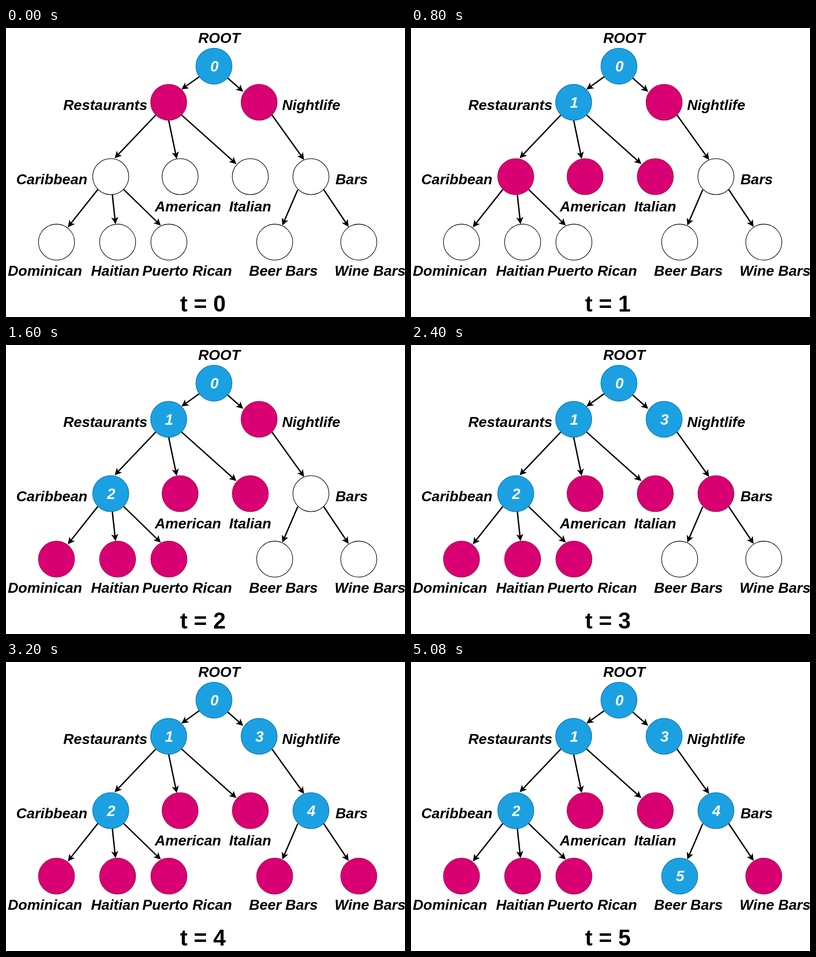
These frames come from a looping animation (878x638 px, 5800 ms). An HTML page:

```html
<!DOCTYPE html>
<html lang="en">
<head>
<meta charset="utf-8">
<title>Tree traversal</title>
<style>
  html, body { margin: 0; width: 100%; height: 100%; overflow: hidden; background: #fff; }
  svg { display: block; width: 878px; height: 638px; }
  text { font: italic bold 32px "Liberation Sans", Arial, sans-serif; white-space: pre; }
  .num { fill: #fff; font-size: 33px; text-anchor: middle; }
  .clock { font-style: normal; font-size: 49.5px; }
  circle { stroke-width: 1.3; }
  .idle { fill: #fff; stroke: #000; }
  .open { fill: #d80073; stroke: #a50040; }
  .done { fill: #1ba1e2; stroke: #006eaf; }
  .edge { stroke: #000; stroke-width: 3; }
</style>
</head>
<body>
<svg id="stage" viewBox="0 0 878 638"></svg>
<script>
const LOOP = 5800, STEP = 800, LAST = 5, NEVER = 9;

// cx, cy, step opened, step visited, label, label x, label baseline
const nodes = [
  [457.6, 84.3, 0, 0, "ROOT", 423, 33],
  [358, 164, 0, 1, "Restaurants", 126, 181],
  [557, 164, 0, 3, "Nightlife", 607.5, 181],
  [230.5, 328.1, 1, 2, "Caribbean", 22.5, 345],
  [383.1, 328.1, 1, NEVER, "American", 327.5, 405],
  [537.6, 328.1, 1, NEVER, "Italian", 491, 405],
  [671, 328.1, 3, 4, "Bars", 725, 345],
  [111.1, 472.7, 2, NEVER, "Dominican", 4, 547],
  [245.6, 472.7, 2, NEVER, "Haitian", 187, 547],
  [358.5, 472.7, 2, NEVER, "Puerto Rican", 300, 547],
  [591.2, 472.7, 4, 5, "Beer Bars", 534.8, 547],
  [776.3, 472.7, 4, NEVER, "Wine Bars", 723, 547]
];

// start x, start y, tip x, tip y
const edges = [
  [425, 107.7, 386, 135.7], [488, 110.7, 522, 140.7],
  [329.5, 192.2, 239, 287.5], [358, 204, 375.7, 289], [386.3, 192, 507, 300.3],
  [585.3, 192.2, 656, 291],
  [202, 356.5, 136, 440], [234, 368, 241, 433], [258.7, 356.2, 340.7, 436.2],
  [642, 357, 608, 436], [699, 356.7, 754, 439]
];

const stage = document.getElementById("stage");

function add(tag, attrs, text = "") {
  const el = document.createElementNS("http://www.w3.org/2000/svg", tag);
  for (const key in attrs) el.setAttribute(key, attrs[key]);
  el.textContent = text;
  return stage.appendChild(el);
}

for (const [x, y, tipX, tipY] of edges) {
  const len = Math.hypot(tipX - x, tipY - y);
  const angle = Math.atan2(tipY - y, tipX - x) * 180 / Math.PI;
  const transform = `translate(${tipX} ${tipY}) rotate(${angle})`;
  add("path", { class: "edge", d: `M${-len} 0H-10`, transform });
  add("path", { d: "M0 0L-15.5 7.8L-11.5 0L-15.5 -7.8Z", transform });
}

const views = nodes.map(([cx, cy, open, visit, label, x, y]) => {
  const circle = add("circle", { cx, cy, r: 39.7 });
  const num = add("text", { class: "num", x: cx + 1, y: cy + 11.5 });
  add("text", { x, y }, label);
  return { circle, num, open, visit };
});
const clock = add("text", { class: "clock", x: 383, y: 626 });

let shown = -1;
function show(step) {
  if (step === shown) return;
  shown = step;
  for (const { circle, num, open, visit } of views) {
    const done = step >= visit;
    circle.setAttribute("class", done ? "done" : step >= open ? "open" : "idle");
    num.textContent = done ? visit : "";
  }
  clock.textContent = "t = " + step;
}

const start = performance.now();
function tick() {
  const time = (performance.now() - start) % LOOP;
  show(Math.min(LAST, Math.floor(time / STEP)));
  requestAnimationFrame(tick);
}
tick();
</script>
</body>
</html>
```
